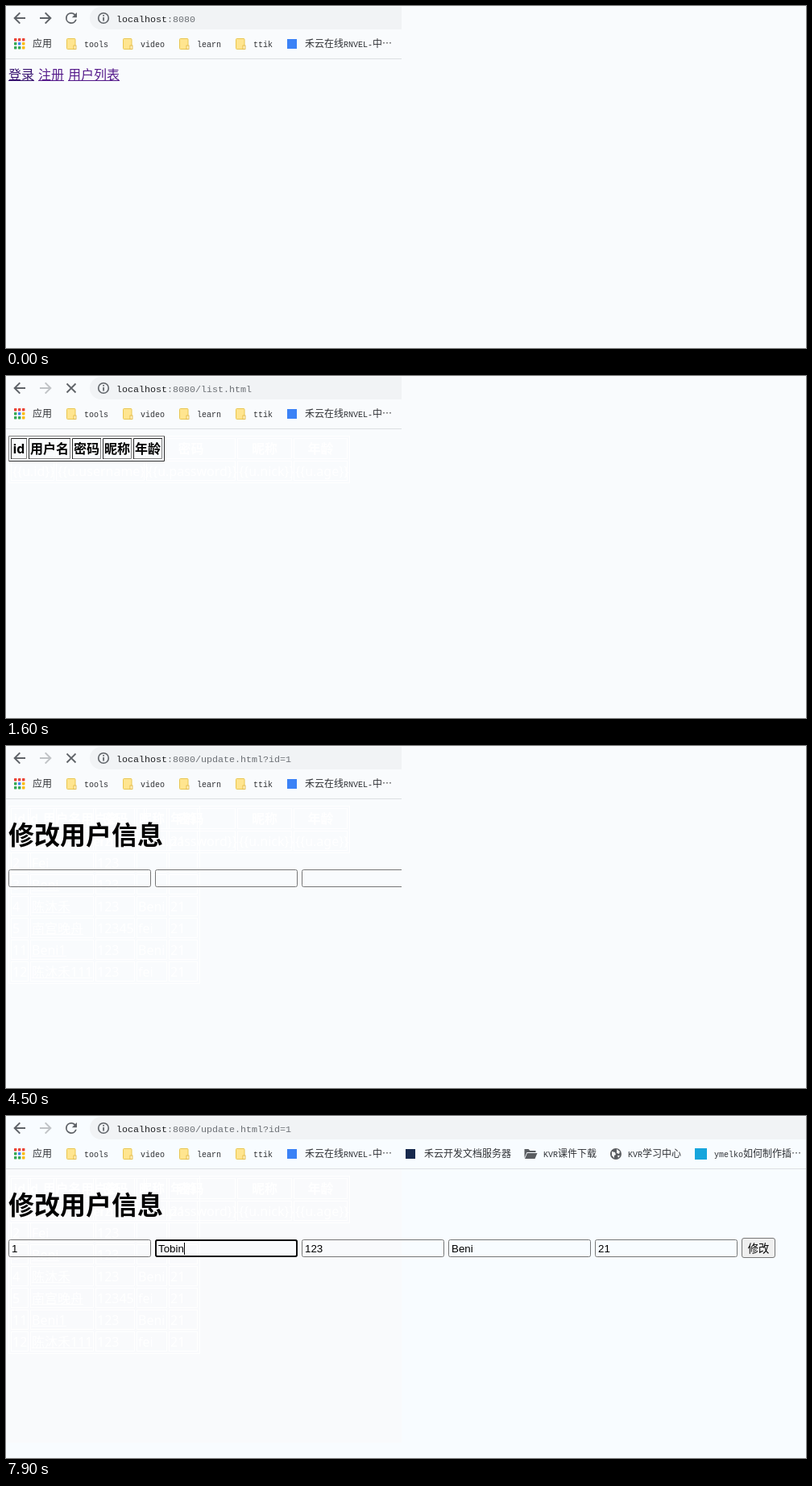
Animation of 993 by 424 pixels, one loop 8 s. Source, as an HTML page:

```html
<!DOCTYPE html>
<html lang="zh-CN">
<head>
<meta charset="utf-8">
<title>用户列表</title>
<style>
  html, body { margin: 0; width: 100%; height: 100%; overflow: hidden; background: #f9fbfd; }
  svg { display: block; }
  text { white-space: pre; font: 16px "Noto Sans", "Noto Sans CJK SC", sans-serif; }
  .b { font-weight: bold; }
  .h1 { font-size: 32px; font-weight: bold; }
  .url { font: 11.67px "Liberation Mono", monospace; }
  .mark { font: 12px "Noto Sans CJK SC", sans-serif; }
  .mark tspan { font: 10px "Liberation Mono", monospace; }
  .field { font: 13.333px "Liberation Sans", "Noto Sans CJK SC", sans-serif; }
  .ghost text, .ghost .line { fill: #fff; }
  .ghost path { stroke: #fff; }
  [data-layer] { visibility: hidden; }
  [data-layer].on { visibility: visible; }
</style>
</head>
<body>
<svg id="stage" width="993" height="424" viewBox="0 0 993 424"></svg>
<script>
const LOOP = 8000;
const INK = '#5f6368', PALE = '#6b6f74', VISITED = '#551a8b', LINK = '#0000ee';

const text = (x, y, s, cls = '', fill = '#000', anchor = 'start') =>
  `<text x="${x}" y="${y}" class="${cls}" fill="${fill}" text-anchor="${anchor}">${s}</text>`;
const rect = (x, y, w, h, attrs) => `<rect x="${x}" y="${y}" width="${w}" height="${h}" ${attrs}/>`;
const stroke = (d, color, w = 1) => `<path d="${d}" fill="none" stroke="${color}" stroke-width="${w}"/>`;
const layer = (name, body, cls = '') => `<g data-layer="${name}" class="${cls}">${body}</g>`;
const link = (x, y, s, w, color) =>
  text(x, y, s, '', color) + rect(x, y + 1, w, 1, `class="line" fill="${color}"`);

// ---- browser bar ----
const arrow = (x, color, flip) =>
  `<g transform="translate(${x} 15) scale(${flip ? -1 : 1} 1)">${stroke('M7 0H-6M0.3 -6.6L-6.3 0L0.3 6.6', color, 2)}</g>`;

const mark = (x, s) =>
  text(x, 51, s.replace(/[ -~]+/g, m => `<tspan>${m}</tspan>`), 'mark', '#303236');

const folder = x =>
  rect(x + .5, 40.5, 10.5, 13, 'rx="1" fill="#ffe58f" stroke="#e9c650"') +
  rect(x + 9, 49, 3, 4.5, 'fill="#fff0bd" stroke="#e0b53c" stroke-width=".8"');

function appGrid() {
  const [r, g, b, y] = ['#ea4335', '#34a853', '#4285f4', '#fbbc05'];
  return [r, r, r, g, b, y, g, g, y].map((c, i) =>
    rect(10 + i % 3 * 5, 40 + Math.floor(i / 3) * 5, 3.4, 3.4, `rx=".6" fill="${c}"`)).join('');
}

const reload = `<path transform="translate(70.5 4.5) scale(.875)" fill="${INK}"
  d="M17.65 6.35A7.95 7.95 0 0 0 12 4a8 8 0 1 0 7.73 10h-2.08A6 6 0 1 1 12 6c1.66 0 3.14.69 4.22 1.78L13 11h7V4z"/>`;

const globe = '<circle cx="757" cy="47" r="7" fill="#5a5d61"/>' +
  '<path d="M752 44l4 1 1 3-2 1v3l-3-3zM758 41l4 3-1 3-3-1zM759 49l3 0-2 3z" fill="#f4f6f8"/>';

const darkFolder = '<path d="M643.5 41h5l2 2h7v2h-11l-3 7z" fill="#5a5d61"/>' +
  '<path d="M647 46h12.5l-3 7h-12.5z" fill="#5a5d61"/>';

const chrome =
  rect(104, 1, 920, 28, 'rx="14" fill="#f1f3f5"') +
  rect(0, 65, 993, 1, 'fill="#dcdfe2"') +
  arrow(17, INK) +
  layer('fwd', arrow(49, INK, true)) + layer('noFwd', arrow(49, '#c0c3c6', true)) +
  layer('reload', reload) +
  layer('stop', stroke('M75.5 9.5L86.5 20.5M86.5 9.5L75.5 20.5', INK, 1.8)) +
  `<circle cx="121" cy="15" r="6.3" fill="none" stroke="${INK}" stroke-width="1.6"/>` +
  rect(120.2, 14, 1.7, 4.5, `fill="${INK}"`) + rect(120.2, 11, 1.7, 1.7, `fill="${INK}"`) +
  text(137, 20, `localhost<tspan fill="${PALE}">:8080</tspan>`, 'url', '#202124') +
  layer('urlList', text(235, 20, '/list.html', 'url', PALE)) +
  layer('urlEdit', text(235, 20, '/update.html?id=1', 'url', PALE)) +
  appGrid() + mark(33, '应用') +
  ['tools', 'video', 'learn', 'ttik'].map((s, i) => folder(75 + 70 * i) + mark(97 + 70 * i, s)).join('') +
  rect(349, 41, 12, 12, 'fill="#3b82f6"') + mark(371, '禾云在线RNVEL-中…') +
  rect(496, 41, 12, 12, 'fill="#17294d"') + mark(519, '禾云开发文档服务器') +
  darkFolder + mark(667, 'KVR课件下载') +
  globe + mark(772, 'KVR学习中心') +
  rect(855, 40, 15, 14, 'fill="#16a5dc"') + mark(879, 'ymelko如何制作插…');

// ---- pages ----
const HEAD = ['id', '用户名', '密码', '昵称', '年龄'];
const DARK = '#2c2c2c', GRAY = '#808080';

// one-pixel box with its top-left and bottom-right sides in two tones
const bevel = (x, y, x2, y2, topLeft, bottomRight) =>
  stroke(`M${x + .5} ${y2}V${y + .5}H${x2}`, topLeft) +
  stroke(`M${x + 1} ${y2 - .5}H${x2 - .5}V${y + 1}`, bottomRight);

// edges: right side of each column; cells are 2px apart
function table(edges, rows) {
  const right = edges[edges.length - 1] + 3;
  let out = bevel(3, 74, right, 106 + 27 * rows.length, GRAY, DARK);
  [HEAD, ...rows].forEach((row, r) => {
    const y = r ? 78 + 27 * r : 77, h = r ? 25 : 26;
    row.forEach((cell, c) => {
      const x = c ? edges[c - 1] + 2 : 6, x2 = edges[c];
      out += bevel(x, y, x2, y + h, DARK, GRAY);
      if (!r) out += text((x + x2) / 2, 96, cell, 'b', '#000', 'middle');
      else if (Array.isArray(cell)) out += link(x + 2, y + 19, ...cell);
      else out += text(x + 2, y + 19, cell);
    });
  });
  return out;
}

const template = table([60, 172, 285, 355, 424],
  [['id', 'username', 'password', 'nick', 'age'].map(k => `{{u.${k}}}`)]);
const empty = table([26, 80, 118, 156, 194], []);
const list = table([28, 109, 160, 200, 238], [
  ['1', ['Tobin', 43, VISITED], '123', 'Beni', '21'],
  ['2', ['Fei', 22, LINK], '123', '', ''],
  ['3', ['Beni', 34, VISITED], '123', '', ''],
  ['4', ['陈沐禾', 48, LINK], '123', 'Beni', '21'],
  ['5', ['南宫晚舟', 64, LINK], '12345', 'fei', '21'],
  ['11', ['Beni1', 43, LINK], '123', 'Beni', '21'],
  ['12', ['陈沐禾111', 75, LINK], '123', 'fei', '21'],
]);

const home = link(3, 91, '登录', 32, '#35106e') + link(40, 91, '注册', 32, VISITED);
const fieldX = i => 3 + 182 * i;
const border = (x, color, w = 1) =>
  rect(x + w / 2, 153 + w / 2, 177 - w, 22 - w, `rx="2" fill="none" stroke="${color}" stroke-width="${w}"`);

const form = text(3, 122, '修改用户信息', 'h1') +
  [0, 1, 2, 3, 4].map(i => border(fieldX(i), '#767676')).join('') +
  rect(913.5, 151.5, 41, 24, 'rx="2.5" fill="#efefef" stroke="#767676"') +
  text(934, 169, '修改', 'field', '#000', 'middle');
const values = ['1', 'Tobin', '123', 'Beni', '21']
  .map((s, i) => text(fieldX(i) + 4, 169, s, 'field')).join('');

const stage = document.getElementById('stage');
stage.innerHTML =
  layer('wide', rect(0, 0, 993, 424, 'fill="#f8fcff"') + rect(0, 66, 491, 339, 'fill="#f9fafc"')) +
  `<svg id="view" width="491" height="424">${chrome}` +
  layer('ghostTpl', template, 'ghost') + layer('ghostList', list, 'ghost') +
  layer('home', home) +
  layer('rest', link(77, 91, '用户列表', 64, VISITED)) +
  layer('press', link(77, 91, '用户列表', 64, '#ff0000')) +
  layer('template', template) + layer('empty', empty) + layer('list', list) +
  layer('form', form) + layer('values', values) +
  layer('hover', border(185, '#333')) +
  layer('focus', border(185, '#101010', 2) + rect(221, 157, 1, 15, 'fill="#000"')) +
  '</svg>';

// ---- timeline: start time and visible layers ----
const EDIT = 'noFwd urlEdit ghostTpl ghostList ';
const STEPS = [
  [0, 'fwd reload home rest'],
  [100, 'fwd reload home press'],
  [1300, 'fwd stop home rest'],
  [1400, 'noFwd stop urlList'],
  [1500, 'noFwd stop urlList template'],
  [1600, 'noFwd stop urlList ghostTpl empty'],
  [2100, 'noFwd reload urlList ghostTpl list'],
  [2200, 'noFwd stop urlList ghostTpl list'],
  [4300, 'noFwd stop urlEdit ghostTpl list'],
  [4400, EDIT + 'stop'],
  [4500, EDIT + 'stop form'],
  [4600, EDIT + 'reload form'],
  [5100, EDIT + 'reload form values'],
  [5200, EDIT + 'reload form values wide'],
  [6900, EDIT + 'reload form values wide hover'],
  [7900, EDIT + 'reload form values wide focus'],
].map(([t, names]) => [t, new Set(names.split(' '))]);

const layers = [...stage.querySelectorAll('[data-layer]')];
const view = document.getElementById('view');
let shown;

function show(step) {
  if (step === shown) return;
  shown = step;
  layers.forEach(g => g.classList.toggle('on', step.has(g.dataset.layer)));
  view.setAttribute('width', step.has('wide') ? 993 : 491);
}

const start = performance.now();
function tick() {
  const t = (performance.now() - start) % LOOP;
  show(STEPS.filter(s => s[0] <= t).pop()[1]);
  requestAnimationFrame(tick);
}
tick();
</script>
</body>
</html>
```
